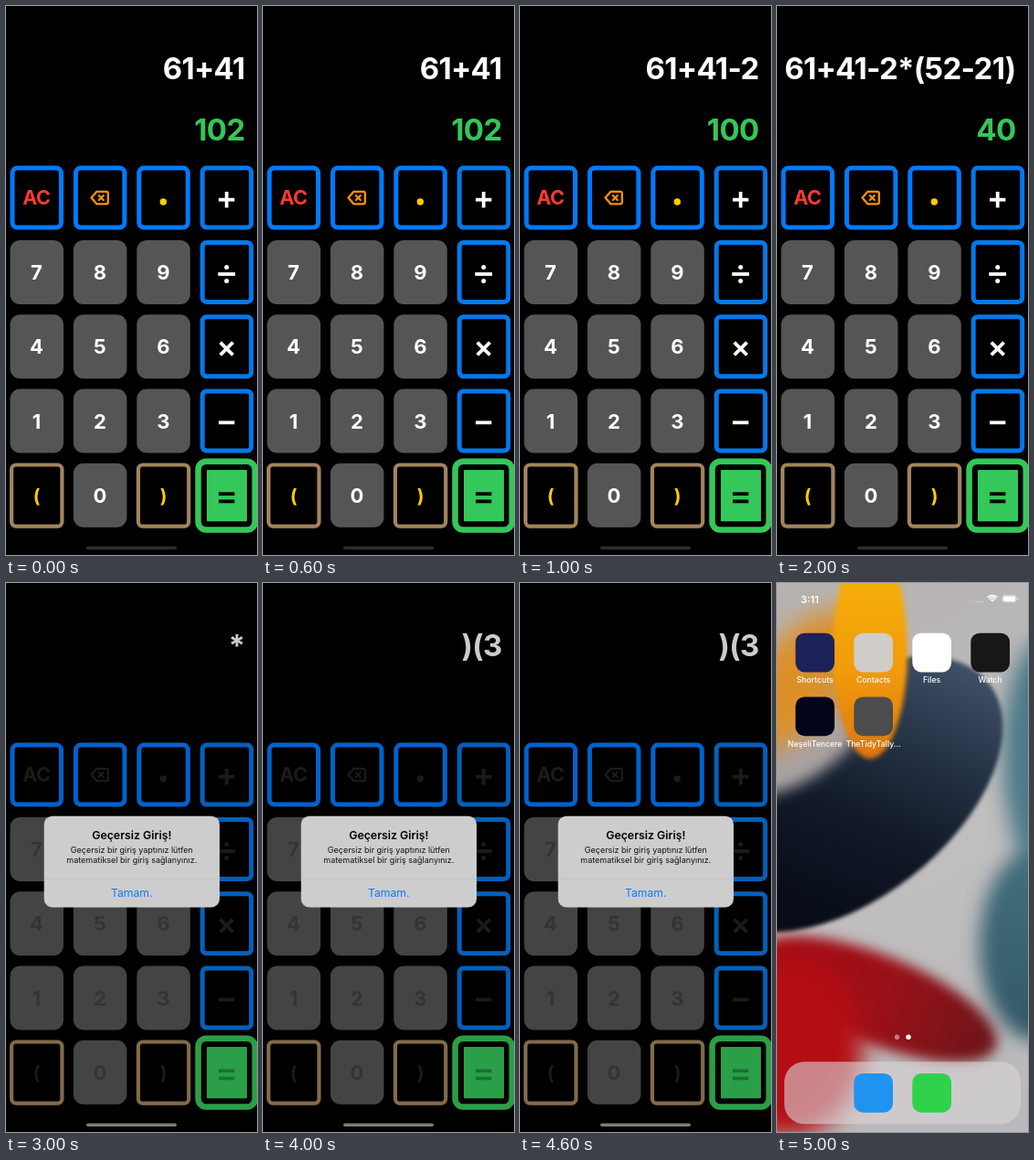
An HTML page with a canvas that plays this animation: 275 px wide and 600 px high, repeating every 6 s.

```html
<!DOCTYPE html>
<html lang="tr">
<head>
<meta charset="utf-8">
<title>Calculator</title>
<style>
html, body { margin: 0; width: 100%; height: 100%; overflow: hidden; background: #000; }
canvas { display: block; width: 275px; height: 600px; }
</style>
</head>
<body>
<canvas id="stage"></canvas>
<script>
const W = 275, H = 600, STEP = 1000;
const KEY_W = 58.5, KEY_H = 70;
const GREEN = '#34c759';
const SCENES = [
  { input: '61+41', result: '102' },
  { input: '61+41-2', result: '100' },
  { input: '61+41-2*(52-21)', result: '40' },
  { input: '*', alert: true },
  { input: ')(3', alert: true },
  { home: true }
];
const APPS = [
  ['Shortcuts', '#1d2159'], ['Contacts', '#d0cdc9'], ['Files', '#ffffff'], ['Watch', '#171717'],
  ['NeşeliTencere', '#04041c'], ['TheTidyTally...', '#4b4c4e']
];

const canvas = document.getElementById('stage');
const ctx = canvas.getContext('2d');
const ratio = window.devicePixelRatio || 1;
canvas.width = W * ratio;
canvas.height = H * ratio;

const keyX = col => 4.5 + 69.4 * col;
const keyY = row => 174.6 + 81.3 * row;

function text(s, x, y, size, weight, color, align = 'center', spacing = 0) {
  ctx.font = `${weight} ${size}px Inter, sans-serif`;
  ctx.letterSpacing = `${spacing}px`;
  ctx.textAlign = align;
  ctx.fillStyle = color;
  ctx.fillText(s, x, y);
}

function box(x, y, w, h, r, color) {
  ctx.fillStyle = color;
  ctx.beginPath();
  ctx.roundRect(x, y, w, h, r);
  ctx.fill();
}

function frame(x, y, w, h, r, line, color) {
  ctx.strokeStyle = color;
  ctx.lineWidth = line;
  ctx.beginPath();
  ctx.roundRect(x + line / 2, y + line / 2, w - line, h - line, r - line / 2);
  ctx.stroke();
}

function dot(x, y, r, color) {
  ctx.fillStyle = color;
  ctx.beginPath();
  ctx.arc(x, y, r, 0, Math.PI * 2);
  ctx.fill();
}

// Bar of the given half length around a centre.
function bar(x, y, half, color, angle = 0, width = 3.8) {
  const dx = half * Math.cos(angle), dy = half * Math.sin(angle);
  ctx.strokeStyle = color;
  ctx.lineWidth = width;
  ctx.beginPath();
  ctx.moveTo(x - dx, y - dy);
  ctx.lineTo(x + dx, y + dy);
  ctx.stroke();
}

function cross(x, y, half, color, angle = 0, width = 3.8) {
  bar(x, y, half, color, angle, width);
  bar(x, y, half, color, angle + Math.PI / 2, width);
}

function backspace(x, y, color) {
  ctx.lineJoin = 'round';
  ctx.strokeStyle = color;
  ctx.lineWidth = 2.3;
  ctx.beginPath();
  ctx.moveTo(x - 9.5, y);
  ctx.lineTo(x - 3.5, y - 6.8);
  ctx.arcTo(x + 8.8, y - 6.8, x + 8.8, y, 1.8);
  ctx.arcTo(x + 8.8, y + 6.8, x, y + 6.8, 1.8);
  ctx.lineTo(x - 3.5, y + 6.8);
  ctx.closePath();
  ctx.stroke();
  cross(x + 1.3, y, 4.4, color, Math.PI / 4, 2.1);
}

function keypad(dim) {
  const pick = (normal, dimmed) => dim ? dimmed : normal;
  const ink = color => pick(color, '#1b1b1b');

  for (let col = 0; col < 3; col++) {
    frame(keyX(col), keyY(0), KEY_W, KEY_H, 8, 5, pick('#007aff', '#0062cc'));
  }
  text('AC', 33.5, 217.3, 21.5, 700, ink('#ff3b30'), 'center', -.4);
  backspace(103, 209.6, ink('#ff9500'));
  dot(172.3, 214, 3.7, ink('#ffcc00'));

  const digit = (n, col, row) => {
    box(keyX(col), keyY(row), KEY_W, KEY_H, 11, pick('#555555', '#444444'));
    text(n, keyX(col) + 29, keyY(row) + 43, 22, 700, pick('#fff', '#343434'));
  };
  for (let n = 1; n <= 9; n++) digit(n, (n - 1) % 3, 4 - Math.ceil(n / 3));
  digit(0, 1, 4);

  ['(', ')'].forEach((s, i) => {
    const x = keyX(2 * i);
    frame(x - .5, keyY(4) - .4, KEY_W + 1, KEY_H + 1.3, 7, 4.2, pick('#a2845e', '#826a4b'));
    text(s, x + 29.2, 543, 20.5, 700, ink('#ffcc00'));
  });

  for (let row = 0; row < 4; row++) {
    frame(keyX(3), keyY(row), KEY_W, KEY_H, 7, 5, pick('#0478ea', '#0360bb'));
  }
  const x = 241.7, op = ink('#fff');
  cross(x, 211.7, 8.7, op);
  bar(x, 293, 9.4, op);
  for (const side of [-1, 1]) dot(x, 293 + side * 7.4, 2.5, op);
  cross(x, 374.5, 9.8, op, Math.PI / 4);
  bar(x, 455.3, 8.7, op);

  const green = pick(GREEN, '#2a9f47');
  frame(207.3, 494.5, 68.7, 81.3, 12, 6.5, green);
  box(220, 507, 44, 56.2, 1, green);
  for (const side of [-1, 1]) bar(x, 537.3 + side * 4.1, 8.7, pick('#000', '#1d7033'));
  box(88, 590.4, 99, 3.6, 1.8, pick('#2d2d2d', '#7c7c7c'));
}

function alertBox() {
  const x = 137.8;
  box(41.7, 254.7, 192.3, 99.8, 9, '#cecdce');
  text('Geçersiz Giriş!', x, 280.3, 12.3, 600, '#000');
  text('Geçersiz bir giriş yaptınız lütfen', x, 294.5, 9, 400, '#111');
  text('matematiksel bir giriş sağlanyınız.', x, 305.6, 9, 400, '#111');
  bar(x, 323.2, 96, '#b9b9bb', 0, .7);
  text('Tamam.', x, 343.2, 12.2, 400, '#087aff');
}

function calculator({ input, result, alert }) {
  ctx.fillStyle = '#000';
  ctx.fillRect(0, 0, W, H);
  text(input, 261.5, 79.5, 33, 700, alert ? '#cccccc' : '#fff', 'right', -.7);
  if (result) text(result, 261.5, 147, 33, 700, GREEN, 'right', -.7);
  keypad(alert);
  if (alert) alertBox();
}

function gradient(x1, y1, x2, y2, ...colors) {
  const g = ctx.createLinearGradient(x1, y1, x2, y2);
  colors.forEach((c, i) => g.addColorStop(i / (colors.length - 1), c));
  return g;
}

// Blurred ellipse, tilted by a number of degrees.
function blob(x, y, rx, ry, tilt, blur, color) {
  ctx.filter = `blur(${blur * ratio}px)`;
  ctx.fillStyle = color;
  ctx.beginPath();
  ctx.ellipse(x, y, rx, ry, tilt * Math.PI / 180, 0, Math.PI * 2);
  ctx.fill();
  ctx.filter = 'none';
}

function wallpaper() {
  ctx.fillStyle = gradient(0, 0, W, H, '#b5b2b0', '#c0bebf', '#b9b8ba');
  ctx.fillRect(0, 0, W, H);
  blob(293, 190, 45, 130, 0, 11, '#4a7987');
  blob(285, 395, 63, 105, 0, 10, gradient(0, 290, 0, 500, '#446f7d', '#315866'));
  blob(77, 231, 197, 114, -38, 2, gradient(190, 70, 60, 370, '#43536a', '#263447', '#111827', '#080d17'));
  blob(20, 150, 110, 62, -38, 8, '#aaa3a3');
  blob(22, 108, 95, 46, -50, 14, '#dc8f28');
  blob(102, 74, 41, 118, 0, 2.5, gradient(0, 0, 0, 192, '#f4ad08', '#f29b0c', '#dc7510'));
  blob(110, 455, 140, 48, 22, 7, gradient(0, 420, 230, 500, '#a30c14', '#9a1018', '#6e1519'));
  blob(10, 505, 85, 100, 0, 13, '#b40d14');
}

function statusBar() {
  const faint = 'rgba(255,255,255,.6)';
  text('3:11', 36, 21.7, 11, 600, '#fff');
  for (let i = 0; i < 4; i++) dot(215.5 + i * 3.2, 20.5, .7, faint);
  ctx.strokeStyle = '#fff';
  ctx.lineWidth = 1.7;
  for (let r = 2.4; r < 8; r += 2.5) {
    ctx.beginPath();
    ctx.arc(236, 21, r, -Math.PI * .75, -Math.PI * .25);
    ctx.stroke();
  }
  frame(246.5, 13.2, 16, 8, 2.5, .8, faint);
  box(247.8, 14.5, 13.4, 5.4, 1.4, '#fff');
  box(263.2, 15.8, 1, 2.8, .5, faint);
}

function home() {
  const tile = (col, y, color) => box(20.3 + col * 64, y, 42.7, 42.7, 9.8, color);
  wallpaper();
  statusBar();
  APPS.forEach(([name, color], i) => {
    const col = i % 4, y = 54.7 + Math.floor(i / 4) * 69.8;
    tile(col, y, color);
    text(name, 41.6 + col * 64, y + 54.3, 8.7, 500, '#fff');
  });
  dot(131.5, 496.2, 2.7, 'rgba(255,255,255,.45)');
  dot(144, 496.2, 2.7, '#fff');
  box(8, 523.3, 259, 68, 22, 'rgba(218,214,215,.6)');
  tile(1, 536, '#2093f0');
  tile(2, 536, '#30d14b');
}

let shown = -1;
function tick() {
  const i = Math.floor(performance.now() / STEP) % SCENES.length;
  if (i !== shown) {
    shown = i;
    ctx.setTransform(ratio, 0, 0, ratio, 0, 0);
    const scene = SCENES[i];
    if (scene.home) home();
    else calculator(scene);
  }
  requestAnimationFrame(tick);
}
tick();
</script>
</body>
</html>
```
